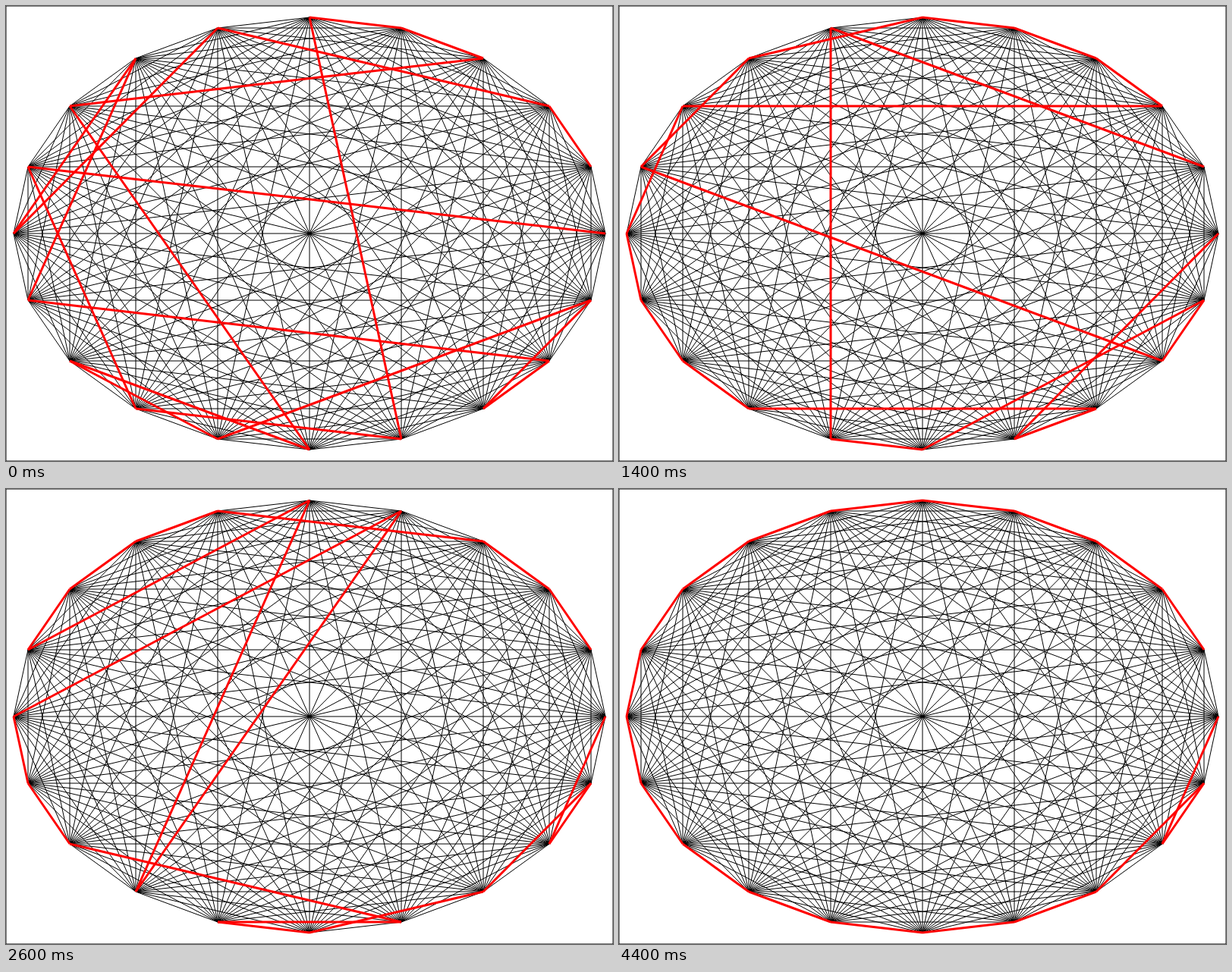
An HTML page with a canvas for the animation above (7.4 s loop, 800x600 px).

```html
<!DOCTYPE html>
<html>
<head>
<meta charset="utf-8">
<title>Route search</title>
<style>
  html, body { margin: 0; width: 100%; height: 100%; overflow: hidden; background: #fff; }
  canvas { display: block; }
</style>
</head>
<body>
<canvas id="stage" width="800" height="600"></canvas>
<script>
const WIDTH = 800, HEIGHT = 600;
const COUNT = 20;
const STEP_MS = 200, LOOP_MS = 7400;
const SETTLE_STEP = 11, LAST_STEP = 22;

const stops = Array.from({ length: COUNT }, (_, i) => i);
const nodes = stops.map(i => {
  const angle = i * 2 * Math.PI / COUNT;
  return [Math.round(400 + 390 * Math.cos(angle)), Math.round(300 + 285 * Math.sin(angle))];
});

// Stops that are still out of order when the route settles; one never gets home.
const strays = [
  { stop: 1, from: 2.5, home: Infinity },
  { stop: 4, from: 6.5, home: 15 },
  { stop: 7, from: 10.4, home: 19 },
  { stop: 15, from: 10.3, home: 15 },
  { stop: 16, from: 10.2, home: LAST_STEP }
];

const mix = (a, b, t) => a + (b - a) * t;
const sortBy = rank => stops.slice().sort((a, b) => rank(a) - rank(b));

// Each stray walks home with a cubic ease-in, passing its neighbours on the way.
function settledRoute(step) {
  const ranks = stops.slice();
  for (const { stop, from, home } of strays) {
    const t = Math.min(1, (step - SETTLE_STEP) / (home - SETTLE_STEP));
    ranks[stop] = mix(from, stop, t ** 3);
  }
  return sortBy(stop => ranks[stop]);
}

// Key routes of the wild early search.
const keyRoutes = [
  { step: 0, route: [0, 11, 7, 4, 15, 16, 17, 12, 5, 8, 6, 1, 3, 2, 9, 13, 10, 14, 18, 19] },
  { step: 4, route: [0, 2, 5, 6, 8, 9, 10, 1, 3, 16, 15, 13, 4, 7, 12, 11, 14, 18, 17, 19] },
  { step: 7, route: [0, 4, 3, 7, 8, 9, 10, 12, 18, 17, 16, 15, 13, 11, 2, 1, 5, 6, 14, 19] },
  { step: SETTLE_STEP, route: settledRoute(SETTLE_STEP) }
];

function routeAt(step) {
  if (step >= SETTLE_STEP) return settledRoute(step);
  const next = keyRoutes.findIndex(key => key.step > step);
  const a = keyRoutes[next - 1], b = keyRoutes[next];
  const t = (step - a.step) / (b.step - a.step);
  return sortBy(stop => mix(a.route.indexOf(stop), b.route.indexOf(stop), t));
}

function strokeLine(ctx, a, b) {
  ctx.beginPath();
  ctx.moveTo(...a);
  ctx.lineTo(...b);
  ctx.stroke();
}

function buildNetwork() {
  const layer = document.createElement("canvas");
  layer.width = WIDTH;
  layer.height = HEIGHT;
  const ctx = layer.getContext("2d");
  ctx.fillStyle = "#fff";
  ctx.fillRect(0, 0, WIDTH, HEIGHT);
  ctx.strokeRect(0, 0, WIDTH, HEIGHT);
  nodes.forEach((a, i) => nodes.slice(i + 1).forEach(b => strokeLine(ctx, a, b)));
  return layer;
}

const ctx = document.getElementById("stage").getContext("2d");
const network = buildNetwork();
ctx.strokeStyle = "#f00";
ctx.lineWidth = 3;

function draw(time) {
  const step = Math.min(Math.floor(time % LOOP_MS / STEP_MS), LAST_STEP);
  const route = routeAt(step);
  ctx.drawImage(network, 0, 0);
  for (let i = 1; i < COUNT; i++) strokeLine(ctx, nodes[route[i - 1]], nodes[route[i]]);
}

const startTime = performance.now();
function tick() {
  draw(performance.now() - startTime);
  requestAnimationFrame(tick);
}
tick();
</script>
</body>
</html>
```
